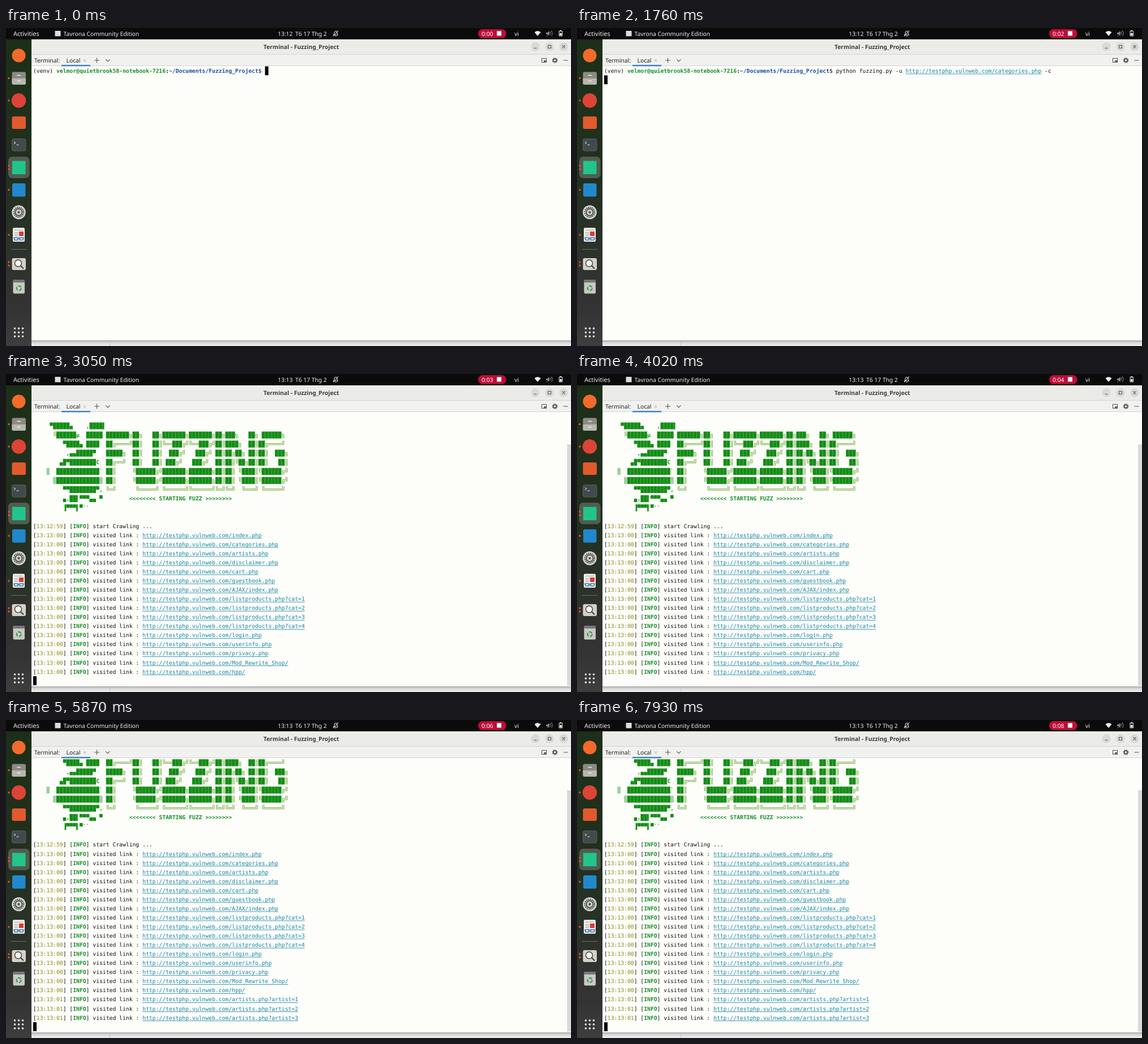
An HTML page that plays this animation: 998 by 561 pixels, repeating every 8 s.

```html
<!DOCTYPE html>
<html lang="en">
<head>
<meta charset="utf-8">
<title>Terminal recording</title>
<style>
html, body { margin: 0; width: 100%; height: 100%; overflow: hidden; background: #fcfdfa; }
svg { display: block; width: 100%; height: 100%; }
text { white-space: pre; text-rendering: geometricPrecision; }
.ui { font: 10.3px "Noto Sans", "Open Sans", sans-serif; }
.mono { font: 9.72px "DejaVu Sans Mono", "Noto Sans Mono", monospace; fill: #111; }
.b { font-weight: bold; }
.green { fill: #16902a; }
.blue { fill: #1b4fa3; }
.olive { fill: #8f8a18; }
.link { fill: #1686a4; }
.line { fill: none; stroke: #555; stroke-width: 1.1; }
</style>
</head>
<body>
<svg viewBox="0 0 998 561" preserveAspectRatio="none">
  <defs>
    <linearGradient id="dock" x2="0" y2="1">
      <stop offset="0" stop-color="#1c2f18"/>
      <stop offset=".45" stop-color="#22301f"/>
      <stop offset=".75" stop-color="#2f332e"/>
      <stop offset=".88" stop-color="#333"/>
      <stop offset="1" stop-color="#3e3e3e"/>
    </linearGradient>
    <linearGradient id="shade" x2="0" y2="1">
      <stop offset="0" stop-color="#aaa"/>
      <stop offset=".4" stop-color="#d8d8d8"/>
      <stop offset="1" stop-color="#f0f0f0"/>
    </linearGradient>
    <clipPath id="view"><path d="M45 67.3H998V550H45Z"/></clipPath>
  </defs>

  <!-- window -->
  <path fill="#fdfdfa" d="M45 20H998V551H45Z"/>
  <path fill="#ebebe8" d="M45 20H998V47H45Z"/>
  <path fill="#f1f2f0" d="M45 47H998V67H45Z"/>
  <path stroke="#d3d3d0" d="M45 46.5H998M45 66.5H998"/>
  <path fill="url(#shade)" d="M45 551H998V561H45Z"/>
  <path stroke="#c8c8c8" d="M183.5 553V561"/>
  <text class="ui b" x="521.5" y="37" text-anchor="middle" fill="#3c3c3c">Terminal - Fuzzing_Project</text>
  <g fill="#d9d9d6"><circle cx="935" cy="33" r="7.7"/><circle cx="960" cy="33" r="7.7"/><circle cx="985" cy="33" r="7.7"/></g>
  <path class="line" d="M932.5 35.5h5M957.5 30.5h5v5h-5zM982.5 30.5l5 5m0-5l-5 5"/>
  <g class="ui" fill="#222"><text x="50" y="60.7">Terminal:</text><text x="106.5" y="60.7">Local</text></g>
  <path fill="#4083c9" d="M98 65H149V67.4H98Z"/>
  <path class="line" style="stroke:#c4c4c4" d="M137 55.5l4 4m0-4l-4 4"/>
  <path class="line" d="M156 57h9m-4.5-4.5v9M176 55.3l3.7 3.7l3.7-3.7M984.5 57h8M946.5 53.5h8v7h-8z"/>
  <path fill="#666" d="M950 57h4v3h-4z"/>
  <circle cx="969.5" cy="57" r="2.8" fill="none" stroke="#5a5a5a" stroke-width="2"/>
  <circle cx="969.5" cy="57" r="4.2" fill="none" stroke="#5a5a5a" stroke-width="1.4" stroke-dasharray="1.7 1.6"/>

  <g clip-path="url(#view)">
    <g id="rows" class="mono"></g>
    <path id="cursor" fill="#000" d="M0 0h6v15.8h-6z"/>
  </g>
  <path id="bar" fill="#dadad8" d="M991 124H998V550H991Z"/>

  <!-- dock -->
  <path fill="url(#dock)" d="M0 20H45V561H0Z"/>
  <path stroke="#667060" d="M9 390.5H36"/>
  <rect x="4" y="227" width="37.5" height="38" rx="7" fill="#535b51"/>
  <circle cx="22.5" cy="48.5" r="12" fill="#f26a2c"/>
  <rect x="10.5" y="77.5" width="24.5" height="22.5" rx="3" fill="#8c8a84"/>
  <path fill="#b9b6ae" d="M10.5 89H35V97q0 3-3 3H13.5q-3 0-3-3z"/>
  <path stroke="#eee" stroke-width="1.6" d="M19.5 83.5h6.5M19.5 93.5h6.5"/>
  <circle cx="22.5" cy="128" r="12.7" fill="#db4437"/>
  <rect x="10.5" y="156" width="24.5" height="22" rx="3" fill="#e2592d"/>
  <rect x="10.5" y="195.500" width="24.5" height="21.5" rx="3" fill="#424a4b" stroke="#60666a" stroke-width=".8"/>
  <path fill="none" stroke="#eee" d="M14 200.500l3 2l-3 2M18.500 206h4"/>
  <rect x="11" y="234.500" width="23.500" height="23.500" fill="#21c58a"/>
  <rect x="11" y="274" width="23.500" height="23.500" rx="3" fill="#2188cc"/>
  <circle cx="22.5" cy="325" r="12.300" fill="#d4d4d0"/>
  <circle cx="22.5" cy="325" r="8.500" fill="none" stroke="#555" stroke-width="2.400" stroke-dasharray="2 1.340"/>
  <circle cx="22.5" cy="325" r="6" fill="none" stroke="#555" stroke-width="2"/>
  <circle cx="22.5" cy="325" r="2.200" fill="#555"/>
  <rect x="12" y="352.500" width="21" height="24.500" rx="2" fill="#f2f2ee"/>
  <path fill="#dc3b34" d="M23 359h8v8h-8z"/>
  <path stroke="#999" d="M14.500 356.500h16M14.500 360.500h7M14.500 363.500h7M14.500 366.500h7"/>
  <path fill="none" stroke="#2f6fae" stroke-width="1.500" d="M14 370h7v4h-6zM24 370h7l-1 4h-6zM21 371h3"/>
  <rect x="10.500" y="406" width="24.500" height="21" rx="3" fill="#d5d1c6"/>
  <circle cx="21.500" cy="415" r="6" fill="#f5f5f2" stroke="#444" stroke-width="1.500"/>
  <path stroke="#444" stroke-width="2.200" d="M26 419.500l5 5"/>
  <rect x="12.500" y="444" width="20.500" height="24.500" rx="2.500" fill="#c9c9c4"/>
  <path fill="#777" d="M12.500 446.500q0-2.500 2.500-2.500h15.500q2.500 0 2.500 2.500v2.500h-20.500z"/>
  <circle cx="22.700" cy="459" r="4" fill="none" stroke="#2f9a4a" stroke-width="2.200" stroke-dasharray="6 2.380"/>
  <g id="dots" fill="#e9522b"></g>
  <g id="grid" fill="#f2f2f2"></g>

  <!-- top bar -->
  <path fill="#0b0b0b" d="M0 0H998V20H0Z"/>
  <g class="ui" fill="#eee">
    <text x="13" y="13.700" font-size="11">Activities</text>
    <text x="101.500" y="13.700">Tavrona Community Edition</text>
    <text id="clock" x="480" y="13.500"></text>
    <text x="511" y="13.500">T6 17 Thg 2</text>
    <text x="898" y="13.500">vi</text>
  </g>
  <rect x="86.500" y="5" width="10" height="9.500" fill="#ddd"/>
  <path fill="none" stroke="#ddd" stroke-width="1.100" d="M578.500 12.500q1.500-1.500 1.500-4t2.500-3t2.500 3t1.500 4zM581.500 14.500h2M578 14.500l9-10"/>
  <rect x="834" y="2" width="49.500" height="15.700" rx="7.800" fill="#bf0d38"/>
  <text id="timer" class="ui" x="840" y="13.600" fill="#fff"></text>
  <path fill="#fff" d="M867 5.500h8v8h-8z"/>
  <path fill="#eee" d="M933.500 7.500q5.500-4.500 11 0L939 14z"/>
  <path fill="#888" d="M954 8h2.500l3-3v9l-3-3H954z"/>
  <path fill="none" stroke="#888" d="M961.500 7q2 2.500 0 5M963.500 5q3.500 4.500 0 9M954.500 14.500l10-10"/>
  <path fill="none" stroke="#eee" d="M977 5.500h5.500v8.500h-5.500zM978.500 4.500h2.500"/>
  <path fill="#eee" d="M978 9h3.500v4h-3.500z"/>
</svg>
<script>
const X = 48, W = 5.85, TOP = 67.4, LH = 16.06, LOOP = 8000;
const $ = id => document.getElementById(id);
const colX = c => X + c * W;
const midY = r => TOP + LH * (r + .5);
const esc = s => s.replace(/&/g, "&amp;").replace(/</g, "&lt;").replace(/>/g, "&gt;");

function put(row, col, str, cls = "") {
  const x = colX(col), y = midY(row);
  let out = `<text class="${cls}" x="${x}" y="${y + 3.5}">${esc(str)}</text>`;
  if (cls === "link")
    out += `<path stroke="#2b8ea8" stroke-width=".9" d="M${x} ${y + 5.6}h${str.length * W}"/>`;
  return out;
}

// segments: [text, class] laid out one after another
function segs(row, list) {
  let col = 0;
  return list.map(([s, cls]) => {
    const out = put(row, col, s, cls);
    col += s.length;
    return out;
  }).join("");
}

// Block characters as left, top, width, height in cell fractions
const BLOCKS = {
  "█": [0, 0, 1, 1], "▀": [0, 0, 1, .5], "▄": [0, .5, 1, .5],
  "▌": [0, 0, .5, 1], "▐": [.5, 0, .5, 1], "░": [0, 0, 1, 1]
};
// Double-line corners: directions of the two arms
const CORNERS = { "╔": [1, 1], "╗": [-1, 1], "╚": [1, -1], "╝": [-1, -1], "╙": [1, -1] };
const H = 12.2, GAP = 1.15;

function banner(row, str) {
  const y = midY(row), top = y - H / 2;
  let solid = "", shade = "", lines = "", out = "";
  [...str].forEach((ch, c) => {
    const x = colX(c), m = x + W / 2;
    if (BLOCKS[ch]) {
      const [l, t, w, h] = BLOCKS[ch];
      const d = `M${x + l * W} ${top + t * H}h${w * W - .25}v${h * H}h${.25 - w * W}z`;
      if (ch === "░") shade += d; else solid += d;
    } else if (CORNERS[ch]) {
      const [sx, sy] = CORNERS[ch];
      for (const d of [-GAP, GAP])
        lines += `M${m + sx * W / 2} ${y + d * sy}H${m + d * sx}V${y + sy * H / 2}`;
    } else if (ch === "═") {
      lines += `M${x} ${y - GAP}h${W}M${x} ${y + GAP}h${W}`;
    } else if (ch === "║") {
      lines += `M${m - GAP} ${top}v${H}M${m + GAP} ${top}v${H}`;
    } else if (ch !== " ") {
      out += put(row, c, ch, "b green");
    }
  });
  return `<path fill="#128d14" d="${solid}"/><path fill="#128d14" opacity=".4" d="${shade}"/>` +
    `<path fill="none" stroke="#57961a" stroke-width=".85" d="${lines}"/>` + out;
}

const ART = [
  "     ▀█████▄    ,████▌",
  "      ╙██████µ  █████ ███████╗██╗   ██╗███████╗███████╗██╗███╗   ██╗ ██████╗",
  "         ▀████▄ ████  ██╔════╝██║   ██║╚══███╔╝╚══███╔╝██║████╗  ██║██╔════╝",
  "          ,▄▄█████▀   █████╗  ██║   ██║  ███╔╝   ███╔╝ ██║██╔██╗ ██║██║  ███╗",
  "        ▄█▀████████C  ██╔══╝  ██║   ██║ ███╔╝   ███╔╝  ██║██║╚██╗██║██║   ██║",
  "    ░  █████████████` ██║     ╚██████╔╝███████╗███████╗██║██║ ╚████║╚██████╔╝",
  "      ░█████████████░ ██║     ╚██████╔╝███████╗███████╗██║██║ ╚████║╚██████╔╝",
  "         ▀▀████████▀, ╚═╝      ╚═════╝ ╚══════╝╚══════╝╚═╝╚═╝  ╚═══╝ ╚═════╝",
  "         ▄,██▌▀▀▀▄▄ ▀",
  "         ▐▀▀▀▌▀``"
];

const SITE = "http://testphp.vulnweb.com/";
const PAGES = [
  "index.php", "categories.php", "artists.php", "disclaimer.php", "cart.php", "guestbook.php",
  "AJAX/index.php", ...[1, 2, 3, 4].map(n => "listproducts.php?cat=" + n),
  "login.php", "userinfo.php", "privacy.php", "Mod_Rewrite_Shop/", "hpp/",
  ...[1, 2, 3].map(n => "artists.php?artist=" + n)
];

const PROMPT = [
  ["(venv) "], ["velmor@quietbrook58-notebook-7216", "b green"], [":", "b"],
  ["~/Documents/Fuzzing_Project", "b blue"], ["$ "]
];
const width = list => list.reduce((n, [s]) => n + s.length, 0);
const PROMPT_LEN = width(PROMPT);
const COMMAND = [["python fuzzing.py -u "], [SITE + "categories.php", "link"], [" -c"]];
const COMMAND_LEN = width(COMMAND);

const info = (time, ...rest) =>
  [["["], [time, "olive"], ["] ["], ["INFO", "b green"], ["] "], ...rest];

const rows = [
  segs(0, PROMPT) + `<g id="command" transform="translate(${PROMPT_LEN * W})">${segs(0, COMMAND)}</g>`,
  "",
  ...ART.map((s, i) => banner(i + 2, s) +
    (i === 8 ? put(10, 29, "<<<<<<<< STARTING FUZZ >>>>>>>>", "b green") : "")),
  "",
  segs(13, info("13:12:59", ["start Crawling ..."])),
  ...PAGES.map((p, i) => segs(14 + i,
    info(i < 16 ? "13:13:00" : "13:13:01", ["visited link : "], [SITE + p, "link"])))
];
$("rows").innerHTML = rows.map(r => `<g>${r}</g>`).join("");
const rowEls = [...$("rows").children];

$("dots").innerHTML = [88.5, 128, 243, 249, 285.5, 365, 413, 419]
  .map(y => `<circle cx="5" cy="${y}" r="1.7"/>`).join("");
$("grid").innerHTML = Array.from({ length: 9 }, (_, i) =>
  `<circle cx="${15.5 + i % 3 * 7}" cy="${530 + (i / 3 | 0) * 7}" r="1.8"/>`).join("");

// [time, printed rows]
const OUTPUT = [[0, 1], [1950, 14], [2120, 15], [2270, 18], [2450, 21], [2510, 24],
  [3010, 27], [3050, 30], [4390, 33]];
// Times at which the cursor is hidden: [from, to]
const HIDDEN = [[120, 620], [1110, 1620], [3930, 4390], [5360, 5870], [6370, 6870], [7370, 7930]];
const RECALL = 190, ENTER = 1760;

function draw(t) {
  const n = OUTPUT.filter(([at]) => t >= at).pop()[1];
  const scroll = Math.max(0, n - 29);
  const typed = t >= RECALL, entered = t >= ENTER;
  rowEls.forEach((el, i) => el.style.display = i < n ? "" : "none");
  $("rows").setAttribute("transform", `translate(0 ${-scroll * LH})`);
  $("command").style.display = typed ? "" : "none";
  const col = entered ? 0 : PROMPT_LEN + (typed ? COMMAND_LEN : 0);
  const row = entered ? n - scroll : 0;
  $("cursor").setAttribute("transform", `translate(${colX(col)} ${TOP + row * LH})`);
  $("cursor").style.display = HIDDEN.some(([a, b]) => t >= a && t < b) ? "none" : "";
  $("bar").style.display = scroll ? "" : "none";
  $("timer").textContent = "0:0" + Math.floor((t + 290) / 1000);
  $("clock").textContent = t < 2120 ? "13:12" : "13:13";
}

const start = performance.now();
function tick() {
  draw((performance.now() - start) % LOOP);
  requestAnimationFrame(tick);
}
tick();
</script>
</body>
</html>
```
